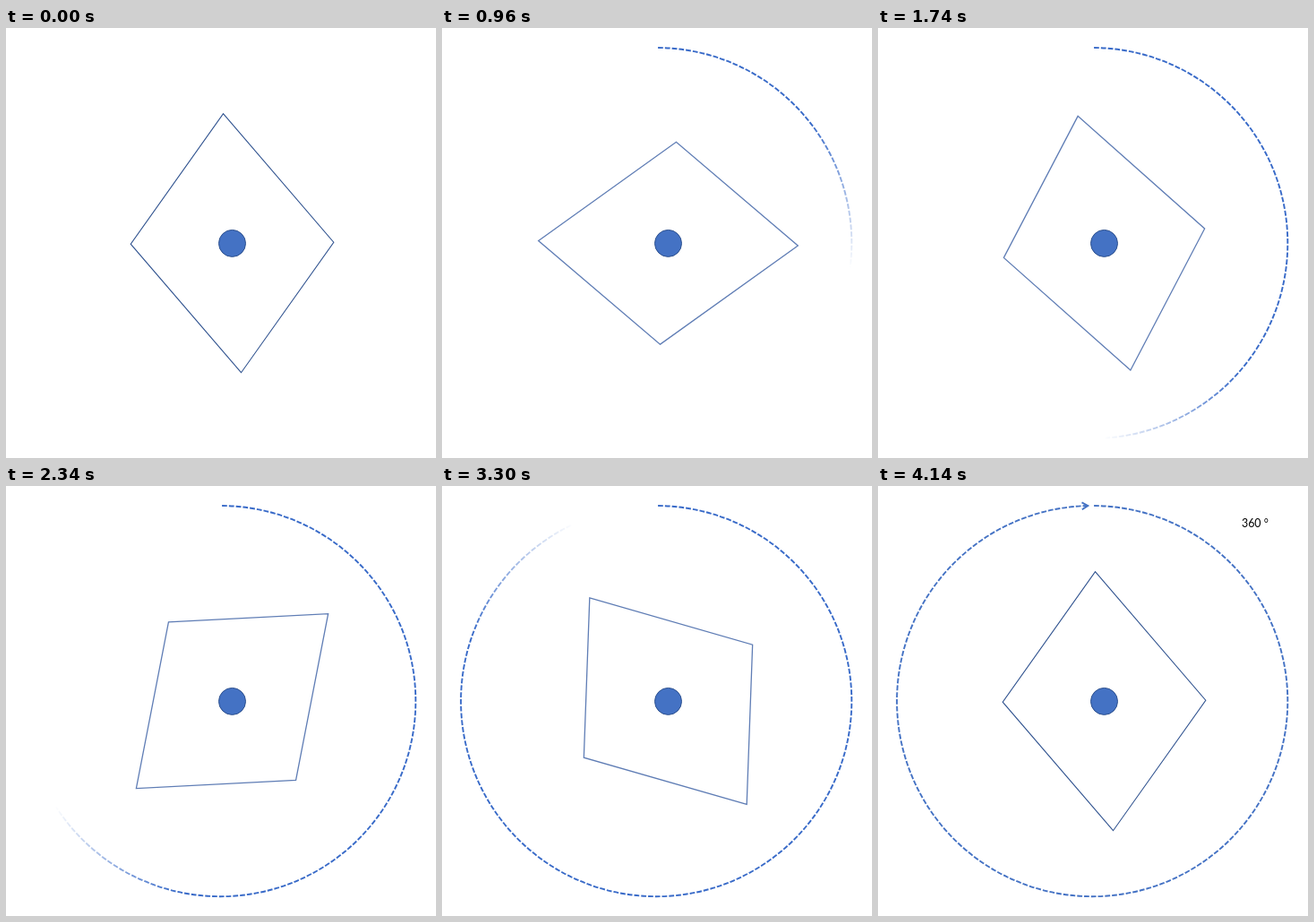
These frames come from a looping animation (480x480 px, 6210 ms). An HTML page with a canvas:

```html
<!DOCTYPE html>
<html lang="en">
<head>
<meta charset="utf-8">
<title>Full turn</title>
<style>
  html, body { margin: 0; width: 100%; height: 100%; overflow: hidden; background: #fff; }
  canvas { display: block; width: 480px; height: 480px; }
</style>
</head>
<body>
<canvas id="stage" width="480" height="480"></canvas>
<script>
const ctx = document.getElementById('stage').getContext('2d');

const LOOP = 6210, TICK = 60, LABEL_AT = 4080, REST_AT = 4140;
const SPIN = 0.099;                  // degrees per ms
const SWEEP = 0.1015, FADE = 45;     // degrees per ms, degrees
const RING = { x: 239.2, y: 240.1, r: 218.1 };
const HUB = { x: 252.5, y: 240.2 };
const rad = deg => deg * Math.PI / 180;
const clamp = (v, lo, hi) => Math.min(hi, Math.max(lo, v));

function drawRhomboid(angle, moving) {
  ctx.save();
  ctx.translate(HUB.x, HUB.y);
  ctx.rotate(rad(angle));
  ctx.beginPath();
  ctx.moveTo(-10, -144.5);
  ctx.lineTo(113.3, -1);
  ctx.lineTo(10, 144.5);
  ctx.lineTo(-113.3, 1);
  ctx.closePath();
  ctx.strokeStyle = moving ? '#5f7db5' : '#2f528f';
  ctx.lineWidth = moving ? 1.3 : 1.1;
  ctx.stroke();
  ctx.restore();
}

function drawHub() {
  ctx.beginPath();
  ctx.arc(HUB.x, HUB.y + 0.2, 15, 0, 2 * Math.PI);
  ctx.fillStyle = '#4472c4';
  ctx.fill();
  ctx.strokeStyle = '#2f528f';
  ctx.lineWidth = 1;
  ctx.stroke();
}

// Stroke that fades out clockwise towards the sweep front.
function sweepStyle(front) {
  const style = ctx.createConicGradient(-Math.PI / 2, RING.x, RING.y);
  for (const a of [0, clamp(front - FADE, 0, 360), clamp(front, 0, 360), 360]) {
    const alpha = clamp((front - a) / FADE, 0, 1);
    style.addColorStop(a / 360, `rgba(56, 106, 200, ${alpha})`);
  }
  return style;
}

function drawRing(style) {
  ctx.strokeStyle = style;
  ctx.lineWidth = 1.9;
  ctx.setLineDash([5.8, 2]);
  ctx.beginPath();
  ctx.arc(RING.x, RING.y, RING.r, rad(-89.5), rad(268.7));
  ctx.stroke();
  ctx.setLineDash([]);
  ctx.beginPath();
  ctx.moveTo(227.5, 18.3);
  ctx.lineTo(234.3, 22);
  ctx.lineTo(227.8, 26.2);
  ctx.stroke();
}

function drawLabel() {
  ctx.font = '12.4px Lato, sans-serif';
  ctx.fillStyle = '#000';
  ctx.fillText('360 °', 406, 46);
}

function draw(time) {
  const t = Math.floor(time % LOOP / TICK) * TICK;
  const angle = Math.min(360, t * SPIN);
  ctx.fillStyle = '#fff';
  ctx.fillRect(0, 0, 480, 480);
  drawRhomboid(angle, t > 0 && t < REST_AT);
  drawHub();
  if (t > 0) drawRing(t < REST_AT ? sweepStyle(t * SWEEP) : '#4472c4');
  if (t >= LABEL_AT) drawLabel();
}

const start = performance.now();
function loop() {
  draw(performance.now() - start);
  requestAnimationFrame(loop);
}
loop();
</script>
</body>
</html>
```
